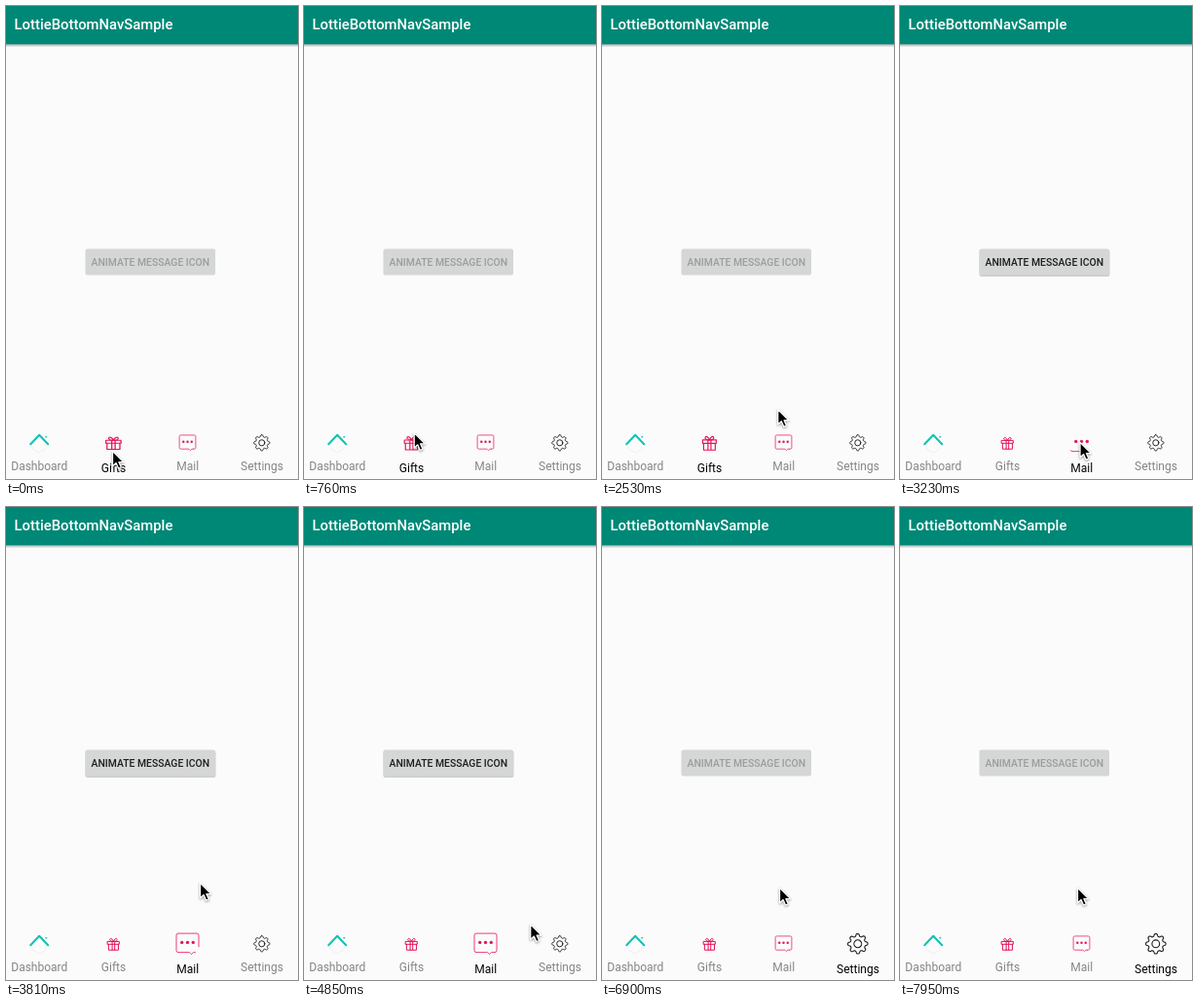
An HTML page that plays this animation: 300x486 px, repeating every 8000 ms.

```html
<!DOCTYPE html>
<html lang="en">
<head>
<meta charset="utf-8">
<title>Bottom navigation</title>
<style>
  html, body { margin: 0; width: 100%; height: 100%; overflow: hidden; background: #fbfbfb; }
  svg { display: block; width: 300px; height: 486px; font-family: Roboto, sans-serif; }
  .label { font-size: 12px; text-anchor: middle; }
  .line { fill: none; stroke-linecap: round; stroke-linejoin: round; }
  .medium { font-weight: 500; }
  #cursor { filter: drop-shadow(.3px 1px .8px #0006); }
</style>
</head>
<body>
<svg viewBox="0 0 300 486">
  <defs>
    <linearGradient id="shade" x2="0" y2="1">
      <stop stop-color="#000" stop-opacity=".32"/>
      <stop offset="1" stop-color="#000" stop-opacity="0"/>
    </linearGradient>
  </defs>
  <rect width="300" height="486" fill="#fbfbfb"/>
  <rect y="39" width="300" height="3.5" fill="url(#shade)"/>
  <rect width="300" height="39.3" fill="#008876"/>
  <text class="medium" x="8.5" y="24.3" font-size="14.85" fill="#fff">LottieBottomNavSample</text>

  <rect id="buttonShadow" x="81.5" y="250.5" width="134" height="27.5" rx="2" fill="#000" opacity=".18"/>
  <rect x="81.5" y="249.5" width="133.5" height="27" rx="2" fill="#d5d6d6"/>
  <text id="buttonText" class="medium" x="148.3" y="267" font-size="10.4" text-anchor="middle">ANIMATE MESSAGE ICON</text>

  <g class="line">
    <path d="M27 452V455L34 459L41 455V452" stroke="#f1f1f1"/>
    <path d="M25.2 450.2L34.2 440.8L43.2 450.2" stroke="#10c2b3" stroke-width="2"/>
    <path d="M41 442.8h.5" stroke="#10c2b3" stroke-width="1.6"/>
  </g>

  <g id="gift" class="line" stroke="#e3125a">
    <path d="M-8.2 -4H8.2V0H-8.2ZM-7 0V8.2H7V0M-1.8 -4V8.2M1.8 -4V8.2"/>
    <path d="M0 -4C-3 -4 -6 -5 -5 -7.5C-4 -9.5 -1 -7 0 -4C1 -7 4 -9.5 5 -7.5C6 -5 3 -4 0 -4"/>
  </g>
  <g id="confetti"></g>

  <g id="mail" stroke="#ee3c78">
    <path id="bubble" class="line" pathLength="1"
      d="M8 9H6L4 11L2 9H-9.5a2 2 0 0 1-2-2V-8.5a2 2 0 0 1 2-2H9.5a2 2 0 0 1 2 2V7a2 2 0 0 1-2 2H8"/>
    <g id="dots" fill="#e0185a" stroke="none">
      <circle cx="-5.8" r="1.7"/><circle r="1.7"/><circle cx="5.8" r="1.7"/>
    </g>
  </g>

  <g id="gear" class="line" stroke="#1c1c1c">
    <path id="cog"/><circle r="3.9"/>
  </g>

  <text class="label" x="34.3" y="476.6" fill="#858585">Dashboard</text>
  <text id="giftLabel" class="label" x="110.5">Gifts</text>
  <text id="mailLabel" class="label" x="186.7">Mail</text>
  <text id="gearLabel" class="label" x="263">Settings</text>

  <path id="cursor" d="M0 0V15.5L3.6 12.2L6.1 17.8L8.9 16.6L6.4 11.2H11.2Z"
    fill="#000" stroke="#fff" stroke-width="1.3" stroke-linejoin="round"/>
</svg>
<script>
const LOOP = 8000, MAIL_TAP = 3000, GEAR_TAP = 5620;
const $ = id => document.getElementById(id);
const clamp = x => Math.max(0, Math.min(1, x));
const span = (t, from, to) => clamp((t - from) / (to - from));
const smooth = x => x * x * (3 - 2 * x);
const mix = (a, b, k) => a + (b - a) * k;

// Pointer stops: time, x, y
const pointer = [
  [0, 109.5, 457.4], [500, 109.5, 457.4], [820, 114, 434.4], [1240, 152.5, 352.4], [1810, 152.5, 352.4],
  [2230, 179, 402.4], [2470, 179.5, 404.4], [2530, 180.7, 414.4], [2760, 185, 448.4], [3240, 185, 448.4],
  [3750, 199.5, 386.4], [4510, 199.5, 386.4], [5080, 255, 457.4], [5680, 255, 457.4],
  [5910, 204, 416.4], [6200, 182.5, 391.4], [LOOP, 182.5, 391.4]
];

const cogPoints = Array.from({ length: 128 }, (_, i) => {
  const a = i / 64 * Math.PI;
  const r = 9 + 1.3 * Math.tanh(1.8 * Math.cos(8 * a));
  return `${(r * Math.sin(a)).toFixed(2)} ${(-r * Math.cos(a)).toFixed(2)}`;
});
$('cog').setAttribute('d', `M${cogPoints.join('L')}Z`);

const noise = n => { const v = Math.sin(n * 91.7) * 4373.3; return v - Math.floor(v); };
const bits = Array.from({ length: 10 }, (_, i) => {
  const dot = document.createElementNS('http://www.w3.org/2000/svg', 'circle');
  dot.setAttribute('r', .5 + .5 * noise(i + 1));
  dot.setAttribute('fill', i % 3 ? '#f28aa9' : '#e5447a');
  $('confetti').append(dot);
  return { dot, x: (i % 2 ? 1 : -1) * (5 + 8 * noise(i + 21)), y: -6 - 8.5 * noise(i + 41) };
});

function placeIcon(id, x, y, scale, width, angle = 0, squash = 0) {
  const shape = `scale(${scale * (1 + squash)} ${scale * (1 - squash)})`;
  $(id).setAttribute('transform', `translate(${x} ${y}) rotate(${angle}) ${shape}`);
  $(id).setAttribute('stroke-width', width / scale);
}

function placeLabel(id, active) {
  const grey = Math.round(mix(133, 0, active));
  $(id).setAttribute('y', mix(476.6, 479.3, active));
  $(id).setAttribute('fill', `rgb(${grey},${grey},${grey})`);
}

function drawGift(t, active) {
  const bounce = span(t, 50, 1250);
  const squash = .11 * (1 - bounce) * Math.cos(bounce * 3 * Math.PI);
  placeIcon('gift', 110.4, 449.3, mix(.72, .85, active), mix(1, 1.15, active), 0, squash);
  const spread = 1 - (1 - span(t, 650, 1350)) ** 2;
  $('confetti').setAttribute('opacity', span(t, 650, 800) * (1 - span(t, 1380, 1510)));
  for (const { dot, x, y } of bits) {
    dot.setAttribute('cx', 110.4 + x * spread);
    dot.setAttribute('cy', 449 + y * spread);
  }
}

function drawMail(t, active) {
  placeIcon('mail', 186.5, 448.6, mix(.73, 1, active), mix(.9, 1, active));
  const trim = t < MAIL_TAP || t >= GEAR_TAP ? 1 : span(t, MAIL_TAP, 3900);
  $('bubble').setAttribute('stroke-dasharray', trim < 1 ? `${trim} 2` : 'none');
  [...$('dots').children].forEach((dot, i) => {
    const hop = Math.sin(Math.PI * span(t, 3820 + i * 90, 4090 + i * 90));
    dot.setAttribute('cy', -1.2 - 2 * hop);
  });
}

function drawPointer(t) {
  const i = pointer.findIndex(stop => stop[0] > t);
  const [t0, x0, y0] = pointer[i - 1], [t1, x1, y1] = pointer[i];
  const k = span(t, t0, t1);
  $('cursor').setAttribute('transform', `translate(${mix(x0, x1, k)} ${mix(y0, y1, k)})`);
}

function draw(now) {
  const t = now % LOOP;
  const mailIn = smooth(span(t, MAIL_TAP, MAIL_TAP + 180));
  const gearIn = smooth(span(t, GEAR_TAP, GEAR_TAP + 180));
  const giftActive = 1 - mailIn, mailActive = mailIn - gearIn;

  drawGift(t, giftActive);
  drawMail(t, mailActive);
  const turn = t < GEAR_TAP ? 0 : (t - 5910) / 1020 * 45;
  placeIcon('gear', 262.8, 448.8, mix(.79, 1, gearIn), mix(.95, 1.1, gearIn), turn);
  placeLabel('giftLabel', giftActive);
  placeLabel('mailLabel', mailActive);
  placeLabel('gearLabel', gearIn);

  const enabled = t >= MAIL_TAP && t < GEAR_TAP;
  $('buttonText').setAttribute('fill', enabled ? '#1e1e1e' : '#9c9d9d');
  $('buttonShadow').setAttribute('visibility', enabled ? 'visible' : 'hidden');
  drawPointer(t);
}

const start = performance.now();
function tick() {
  draw(performance.now() - start);
  requestAnimationFrame(tick);
}
tick();
</script>
</body>
</html>
```
